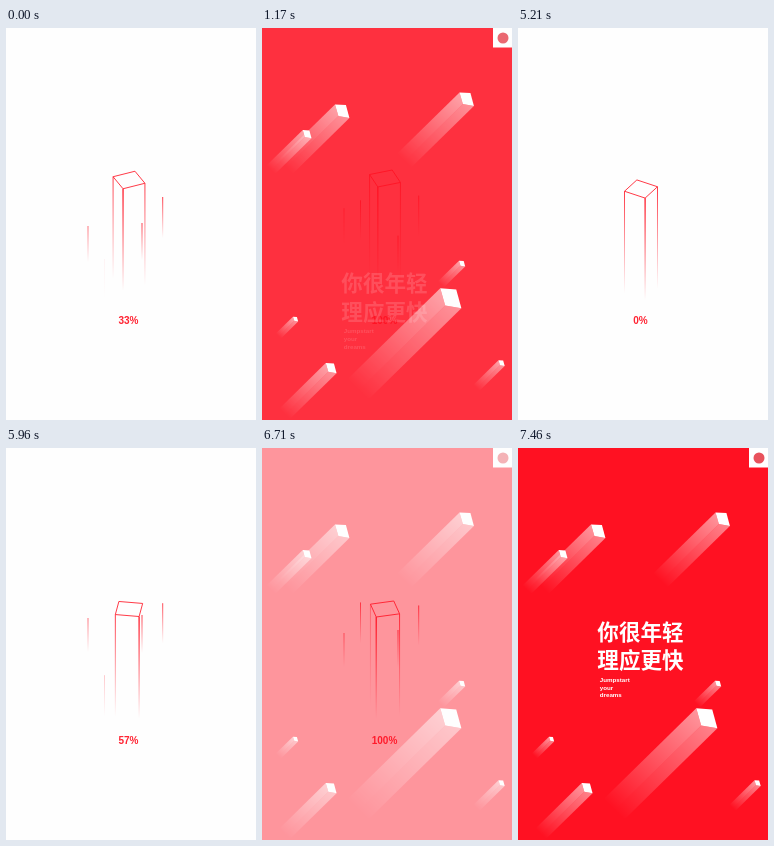
These frames come from a looping animation (250 px wide and 392 px high, 8.64 s). An HTML page:

```html
<!DOCTYPE html>
<html lang="zh">
<head>
<meta charset="utf-8">
<title>Loader and splash</title>
<style>
html, body { margin: 0; width: 100%; height: 100%; overflow: hidden; background: #fefefe; }
svg { display: block; width: 100%; height: 100%; }
.pct { font: bold 10px "Liberation Sans", Arial, sans-serif; fill: #ff2433; text-anchor: middle; }
.big { font: bold 21.6px "Noto Sans CJK SC", "Noto Sans CJK", sans-serif; fill: #fff; }
.small { font: bold 6.2px "Liberation Sans", Arial, sans-serif; fill: #fff; }
</style>
</head>
<body>
<svg viewBox="0 0 250 392" preserveAspectRatio="xMidYMid meet">
  <defs id="defs">
    <linearGradient id="fade" x1="0" y1="0" x2="0" y2="1">
      <stop offset="0" stop-color="#ff2433"/>
      <stop offset="1" stop-color="#ff2433" stop-opacity="0"/>
    </linearGradient>
  </defs>
  <rect width="250" height="392" fill="#fefefe"/>
  <g id="loader">
    <g id="streaks"></g>
    <g id="edges"></g>
    <polygon id="lid" fill="none" stroke="#ff2433" stroke-width="0.9" stroke-linejoin="round"/>
    <text id="pct" class="pct" x="122.5" y="295.6"></text>
  </g>
  <g id="scene">
    <rect width="250" height="392" fill="#ff1122"/>
    <g id="meteors"></g>
    <rect x="231" width="19" height="19.5" fill="#fff"/>
    <circle cx="241" cy="10" r="5.5" fill="#e8525c"/>
  </g>
  <g id="title">
    <text class="big" x="79.3" y="192.2">你很年轻</text>
    <text class="big" x="79.3" y="220.4">理应更快</text>
    <text class="small" x="81.8" y="234.2">Jumpstart</text>
    <text class="small" x="81.8" y="241.7">your</text>
    <text class="small" x="81.8" y="249.3">dreams</text>
  </g>
</svg>
<script>
const LOOP = 8640, SECOND = 5210, STEP = 150;
const $ = id => document.getElementById(id);
const clamp = v => Math.max(0, Math.min(1, v));
const smooth = p => p * p * (3 - 2 * p);
const mod = (a, n) => ((a % n) + n) % n;

function add(parent, tag, attrs) {
  const el = document.createElementNS("http://www.w3.org/2000/svg", tag);
  set(el, attrs);
  return parent.appendChild(el);
}
function set(el, attrs) {
  for (const k in attrs) el.setAttribute(k, attrs[k]);
}

// Meteors: centre x, centre y, cube size, trail length
const METEORS = [
  [80, 83, 14, 56], [45, 106, 8.5, 36], [204.5, 71, 14, 62], [200, 235.5, 6, 21],
  [188.5, 270, 20.5, 92], [33.5, 291, 5, 17], [69, 340, 10.5, 46], [239.5, 335, 6, 25]
];
METEORS.forEach(([cx, cy, s, len], i) => {
  const pt = (x, y) => [cx + x * s, cy + y * s];
  const a = pt(-0.5, -0.47), b = pt(0.28, -0.42), c = pt(0.53, 0.5), d = pt(-0.26, 0.36);
  const tail = p => [p[0] - len, p[1] + len * 0.98];
  const grad = add($("defs"), "linearGradient", {
    id: "trail" + i, gradientUnits: "userSpaceOnUse",
    x1: cx, y1: cy, x2: cx - len, y2: cy + len
  });
  add(grad, "stop", { offset: 0, "stop-color": "#fff", "stop-opacity": 0.56 });
  add(grad, "stop", { offset: 1, "stop-color": "#fff", "stop-opacity": 0 });
  const poly = (pts, fill, opacity) =>
    add($("meteors"), "polygon", { points: pts.join(" "), fill, opacity });
  poly([a, d, tail(d), tail(a)], `url(#trail${i})`, 1);
  poly([d, c, tail(c), tail(d)], `url(#trail${i})`, 0.86);
  poly([a, b, c, d], "#fff", 1);
});

// Each run: time reference, cube angle there, streaks as x, length, top, speed
const RUNS = [
  { ref: 480, angle: 20.5, streaks: [
    [82, 36, 198, 0.246], [98.5, 40, 231, 0.204], [136, 37, 195, 0.22], [156.7, 41, 169, 0.232]] },
  { ref: 1350, angle: 53.5, streaks: [
    [82, 34, 218, 0.22], [98.5, 41, 187, 0.217], [136, 38, 215, 0.22], [156.7, 40, 193, 0.237]] }
];
const bars = (id, n) => Array.from({ length: n }, () => add($(id), "rect", { fill: "url(#fade)" }));
const streakEls = bars("streaks", 4), edgeEls = bars("edges", 3);

function drawStreaks(run, u) {
  const TOP = 142, SPAN = 90;
  run.streaks.forEach(([x, h, y0, v], i) => {
    const y = TOP + mod(y0 - v * (u - run.ref) - TOP, SPAN);
    const seen = clamp((TOP + SPAN - y) / 18) * clamp((y - TOP) / 14) * clamp((u - 50) / 200);
    set(streakEls[i], {
      x: x - 0.5, y, width: 1, height: h, opacity: seen * (i === 0 ? 0.65 : 0.9)
    });
  });
}

function drawCube(run, u, cy) {
  const R = 17, TILT = 0.55;
  const base = run.angle - 0.15 * (u - run.ref);
  const pts = [0, 90, 180, 270].map(k => {
    const a = (base + k) * Math.PI / 180;
    return [123 + R * Math.cos(a), cy + R * TILT * Math.sin(a)];
  });
  $("lid").setAttribute("points", pts.join(" "));
  // The rearmost corner has no visible edge
  const near = [...pts].sort((p, q) => q[1] - p[1]).slice(0, 3);
  near.forEach(([x, y], i) => {
    const gap = Math.min(...near.filter((_, j) => j !== i).map(p => Math.abs(p[0] - x)));
    const w = i === 0 ? 1.4 : 1;
    set(edgeEls[i], {
      x: x - w / 2, y, width: w, height: 102,
      opacity: i === 0 ? 1 : clamp((gap - 4) / 4) * 0.9
    });
  });
}

function draw(t) {
  const first = t < SECOND;
  const run = RUNS[first ? 0 : 1];
  // The picture advances in steps
  const start = first ? (t < 1170 ? 0 : 1170) : SECOND;
  const s = first && t >= 1760 ? 1760 : start + Math.floor((t - start) / STEP) * STEP;
  const u = first ? s + 480 : s - SECOND;

  const cover = smooth(clamp((u - 1280) / 480));
  $("scene").setAttribute("opacity", cover);
  $("loader").setAttribute("visibility", cover < 1 ? "visible" : "hidden");
  drawStreaks(run, u);
  drawCube(run, u, first ? 152 - s * 0.0013 : 161);
  $("pct").textContent = Math.floor(100 * clamp((u - 110) * 0.000893)) + "%";

  const p = clamp((u - 1590) / 650);
  set($("title"), {
    opacity: clamp(p * 1.6),
    transform: `translate(0 ${105 * Math.pow(1 - p, 4)})`
  });
}

const t0 = performance.now();
function tick() {
  draw((performance.now() - t0) % LOOP);
  requestAnimationFrame(tick);
}
tick();
</script>
</body>
</html>
```
